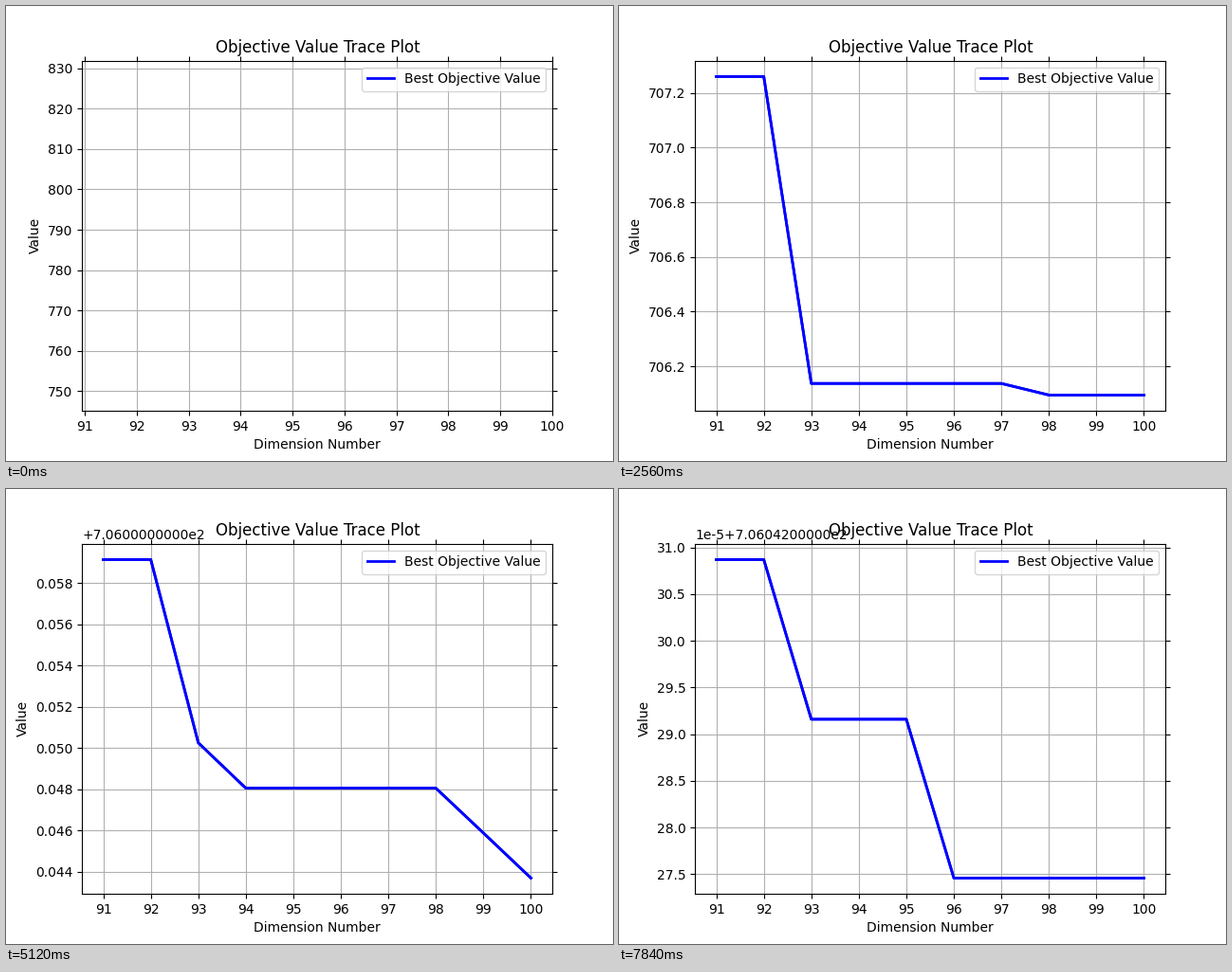
A matplotlib script for the animation above (8000 ms loop, 640 by 480 pixels).

```python
import matplotlib.pyplot as plt
import numpy as np
from matplotlib.animation import FuncAnimation
from matplotlib.ticker import ScalarFormatter

WINDOW = 10
FRAMES = 50
STEP_MS = 160
FLOOR = 706.0

# Iterations at which the search improves, with the new level above FLOOR.
DROPS = {3: 4.86, 5: 3.21, 7: 1.26, 9: 0.13738, 14: 0.09507, 17: 0.09406,
         20: 0.09391, 21: 0.06016, 22: 0.05914, 25: 0.05026, 26: 0.04806,
         31: 0.045889, 32: 0.043706, 33: 0.043285, 34: 0.043161,
         36: 0.042708, 37: 0.042619, 39: 0.04234, 40: 0.0423087,
         42: 0.0422916, 45: 0.0422746}


class LongOffset(ScalarFormatter):
    """Scalar formatter that writes the offset with ten decimals."""

    def get_offset(self):
        if not self.offset:
            return super().get_offset()
        mantissa, power = f"{self.offset:+.10e}".split("e")
        order = self.orderOfMagnitude
        scale = f"1e{order}" if order else ""
        return f"{scale}{mantissa}e{int(power)}"


def best_values(n):
    """Geometric decay at first, then plateaus between the drops."""
    it = np.arange(n)
    level = 82.5 * 0.6207 ** it
    for start, drop in DROPS.items():
        level[start:] = drop
    return FLOOR + level


best = best_values(FRAMES)
slots = np.arange(1, WINDOW + 1)

fig, ax = plt.subplots(figsize=(6.4, 4.8), dpi=100)


def draw(i):
    ax.clear()
    y = best[max(0, i + 1 - WINDOW):i + 1]
    # Two passes give the trace its firmer edge.
    for label in ("Best Objective Value", None):
        ax.plot(slots[:len(y)], y, color="blue", lw=2, label=label)
    ax.set_xticks(slots, labels=[str(90 + s) for s in slots])
    ax.yaxis.set_major_formatter(LongOffset())
    ax.tick_params(top=True, right=True)
    ax.set_title("Objective Value Trace Plot", x=0.502, y=1.0)
    ax.set_xlabel("Dimension Number")
    ax.set_ylabel("Value")
    ax.grid(True)
    ax.legend(loc="upper right")
    return ax.lines


anim = FuncAnimation(fig, draw, frames=FRAMES, init_func=lambda: draw(0),
                     interval=STEP_MS, repeat=True, repeat_delay=0)
plt.show()
```
